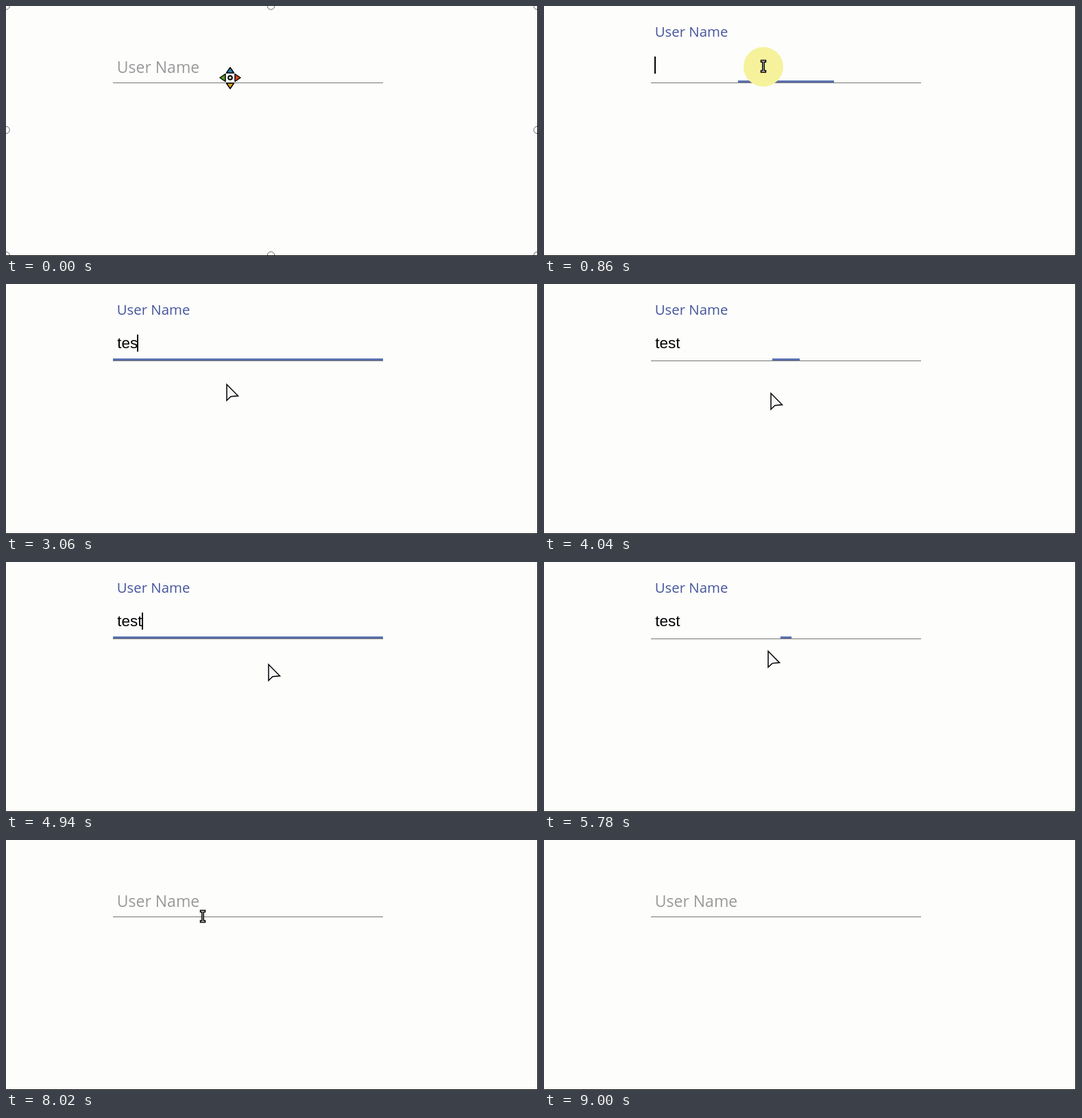
Animation, 776 px wide and 366 px high, one loop 9.7 s. Source, as an HTML page:

```html
<!DOCTYPE html>
<html lang="en">
<head>
<meta charset="utf-8">
<title>Floating label input</title>
<style>
  html, body { margin: 0; width: 100%; height: 100%; overflow: hidden; background: #fdfdfc; }
  svg { display: block; width: 776px; height: 366px; }
  #label { font: 23px "Open Sans", "Noto Sans", sans-serif; }
  #value { font: 22.5px "Liberation Sans", Arial, sans-serif; }
  .outline { stroke: #000; stroke-width: 1.5; fill: #f6f6fa; }
</style>
</head>
<body>
<svg viewBox="0 0 776 366">
  <rect width="776" height="366" fill="#fdfdfc"/>
  <g id="handles" fill="#fff" stroke="#666"></g>
  <path d="M775.5 0V365.5H0" fill="none" stroke="#000"/>

  <rect x="156" y="112" width="394" height="1" fill="#757575"/>
  <rect id="bar" y="109" height="3" fill="#5a70ae"/>
  <text id="label">User Name</text>
  <rect id="selection" x="162" y="74" width="37" height="26" fill="#2f63c8"/>
  <text id="value" x="162.3" y="94"></text>
  <rect id="caret" y="74" width="2" height="25"/>

  <g id="cursor">
    <circle id="press" r="29" cy="1" fill="#f6f29c"/>
    <path id="arrow" class="outline" d="M0 0V23.5L6 17.8L16.5 16.8Z"/>
    <path id="beam" class="outline" d="M-3.5-8.5H3.5V-6H1.2V6.5H3.5V9H-3.5V6.5H-1.2V-6H-3.5Z"/>
    <g id="mover" stroke="#000" stroke-width="1.5" stroke-linejoin="round">
      <path d="M0-15L5.5-7H-5.5Z" fill="#2f83b5"/>
      <path d="M15 0L7-5.5V5.5Z" fill="#d8481c"/>
      <path d="M0 16L5.5 8H-5.5Z" fill="#d9a41c"/>
      <path d="M-15 0L-7-5.5V5.5Z" fill="#5aa52c"/>
      <circle r="2.8" fill="#fff" stroke-width="2"/>
    </g>
  </g>
</svg>
<script>
const LOOP = 9700, PRESS = 180, KEY = 105;
const typeAt = 2830, clearAt = 7030;
const $ = id => document.getElementById(id);
const show = (id, on) => $(id).style.display = on ? '' : 'none';
const set = (id, attrs) => Object.entries(attrs).forEach(([k, v]) => $(id).setAttribute(k, v));
const mix = (a, b, k) => a + (b - a) * k;
const clamp = k => Math.min(1, Math.max(0, k));
const smooth = k => k * k * (3 - 2 * k);

// Where the pointer arrives, when, and what it clicks there
const stop = (at, x, y, click) => ({ at, x, y, click });
const stops = [
  stop(0, 327, 105),
  stop(700, 320, 88, 'focus'),
  stop(1534, 336, 143, 'blur'),
  stop(2050, 283, 98, 'focus'),
  stop(3060, 322, 147),
  stop(3720, 331, 160, 'blur'),
  stop(4545, 314, 73, 'focus'),
  stop(4940, 383, 150),
  stop(5430, 376, 163, 'blur'),
  stop(6050, 240, 73, 'focus'),
  stop(6330, 196, 79, 'select'),
  stop(6580, 312, 159),
  stop(7075, 339, 186, 'blur'),
  stop(7840, 287, 111.5),
  stop(8980, 706, 370)
];
const clicks = stops.filter(s => s.click);
const selectAt = clicks.find(s => s.click === 'select').at;

const typed = t => t < clearAt ? Math.min(4, Math.max(0, Math.floor((t - typeAt) / KEY) + 1)) : 0;
const focusEvents = clicks.map(s => ({ at: s.at, on: s.click !== 'blur' }));
const labelEvents = focusEvents.map(e => ({ at: e.at, on: e.on || typed(e.at) > 0 }));

// 0..1 progress of a two-way transition switched by events
function transition(events, t, ms) {
  const past = events.filter(e => e.at <= t);
  const last = past.pop() || { on: false };
  const before = past.pop() || { on: false };
  if (last.on === before.on) return +last.on;
  return mix(+before.on, +last.on, smooth(clamp((t - last.at) / ms)));
}

// Rest at a stop, then move on just in time; longer ways take longer
function pointer(t) {
  const i = stops.findIndex(s => s.at > t);
  const a = stops[i - 1], b = stops[i];
  const ms = Math.min(b.at - a.at, 200 + 1.55 * Math.hypot(b.x - a.x, b.y - a.y));
  const k = smooth(clamp((t - b.at + ms) / ms));
  return [mix(a.x, b.x, k), mix(a.y, b.y, k)];
}

function drawField(t) {
  const width = 394 * transition(focusEvents, t, 400);
  set('bar', { x: 353 - width / 2, width });

  const up = transition(labelEvents, t, 120);
  set('label', { transform: `translate(161.8 ${mix(98, 45.3, up)}) scale(${mix(1, 0.885, up)})` });
  $('label').style.fill = `color-mix(in srgb, #44559a ${up * 100}%, #999)`;

  const count = typed(t);
  const selected = t >= selectAt && t < clearAt;
  $('value').textContent = 'test'.slice(0, count);
  set('value', { fill: selected ? '#fff' : '#000' });
  show('selection', selected);

  const focus = focusEvents.filter(e => e.at <= t).pop();
  const lastKey = count ? typeAt + (count - 1) * KEY : 0;
  const blinkOn = focus && (t - Math.max(focus.at, lastKey)) % 1060 < 530;
  show('caret', focus && focus.on && !selected && blinkOn);
  set('caret', { x: Math.round(161.4 + $('value').getComputedTextLength()) });
}

function drawPointer(t) {
  const moving = t < 20;
  const visible = t < stops[stops.length - 1].at;
  show('handles', moving);
  show('cursor', visible);
  if (!visible) return;
  const [x, y] = pointer(t);
  const overField = x > 156 && x < 550 && y > 66 && y < 114;
  set('cursor', { transform: `translate(${x} ${y})` });
  show('mover', moving);
  show('beam', !moving && overField);
  show('arrow', !moving && !overField);
  show('press', clicks.some(s => t >= s.at - 20 && t < s.at + PRESS));
}

for (const x of [0, 386.5, 775])
  for (const y of [0, 181.5, 365])
    if (x !== 386.5 || y !== 181.5)
      $('handles').insertAdjacentHTML('beforeend', `<circle cx="${x}" cy="${y}" r="5.2"/>`);

const start = performance.now();
function frame() {
  const t = (performance.now() - start) % LOOP;
  drawField(t);
  drawPointer(t);
  requestAnimationFrame(frame);
}
frame();
</script>
</body>
</html>
```
